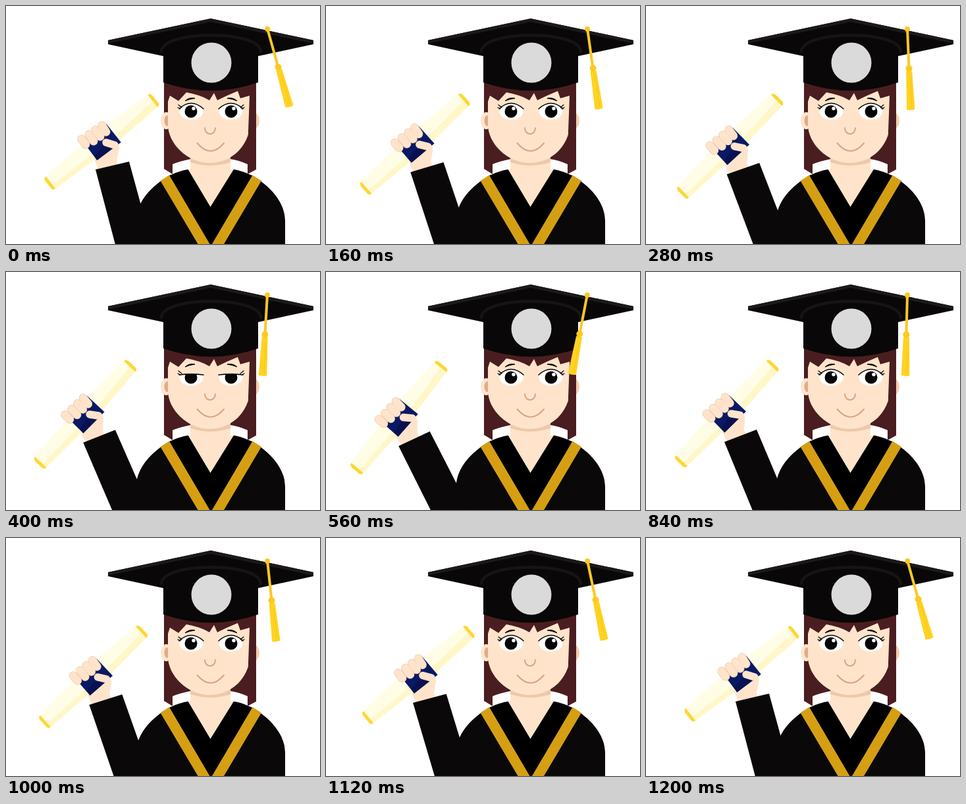
Animation of 477 by 361 pixels, one loop 1240 ms. Source, as an HTML page:

```html
<!DOCTYPE html>
<html lang="en">
<head>
<meta charset="utf-8">
<title>Graduate waving a diploma</title>
<style>
html, body { margin: 0; width: 100%; height: 100%; overflow: hidden; background: #fff; }
svg { display: block; width: 477px; height: 361px; }
.skin { fill: #ffe4cb; }
.hair { fill: #4a1e20; }
.gown { fill: #0a0808; }
.line { fill: none; stroke-linecap: round; }
</style>
</head>
<body>
<svg viewBox="0 0 477 361">
  <defs>
    <g id="eye">
      <ellipse cx="281.500" cy="160" rx="18" ry="12.500" fill="#fff"/>
      <circle cx="281" cy="160" r="9.500" fill="#060505"/>
      <path class="skin lid"/>
      <path class="line lash" stroke="#0a0707" stroke-width="1.600"/>
      <path class="line" d="M265 156L261 154M267 154L262 150" stroke="#0a0707" stroke-width="1.300"/>
    </g>
    <path id="brow" d="M272 144Q278 138 287 140Q279 141 272 144Z" fill="#0a0707" stroke="#0a0707"/>
    <path id="stole" d="M234.500 265L248 256.500L309.500 361H291.500Z" fill="#d59f14"/>
  </defs>

  <!-- head -->
  <path class="hair" d="M240 112H380V248L367 255V240Q354 234 340 232H281Q265 235 253 240V255L240 247Z"/>
  <path class="skin" d="M280 225H341V248L347 249L311 306L276 249L280 248Z"/>
  <path d="M280 230H341V237Q311 247 280 237Z" fill="#edc9ac"/>
  <ellipse class="skin" cx="243.500" cy="174" rx="8.500" ry="13"/>
  <ellipse cx="245" cy="174" rx="4.500" ry="8" fill="#deab8a"/>
  <ellipse cx="377" cy="174" rx="8" ry="12" fill="#f2cfb0"/>
  <path class="skin" d="M246 122H371V180C368 213 343 238 309 238S246 208 246 180Z"/>
  <path class="hair" d="M371 112H380V248L368 240V190Z"/>
  <use href="#eye"/>
  <use href="#eye" transform="matrix(-1 0 0 1 623 0)"/>
  <g id="glints" fill="#fff">
    <circle cx="285" cy="155.500" r="2.700"/>
    <circle cx="346" cy="155.500" r="2.700"/>
  </g>
  <path class="hair" d="M240 110H380V136H370L356 140L352 129Q337 135 321 143L316 132L309 143Q296 135 274 131L262 144L249 136L246 145H240Z"/>
  <use href="#brow"/>
  <use href="#brow" transform="matrix(-1 0 0 1 623 0)"/>
  <path class="line" d="M302 185C302 197 318 197 318 185M290.500 208Q311 232 331 208" stroke="#daa583" stroke-width="2"/>

  <!-- cap -->
  <path d="M155 52L311 19L467 52V58L383 76V116Q311 141 239 116V76L155 58Z" fill="#090707"/>
  <path d="M155 52L311 19L467 52V57L311 24L155 57Z" fill="#1c1919"/>
  <path class="line" d="M236 69C238 36 385 36 387 69" stroke="#171414" stroke-width="4.500"/>
  <circle cx="312" cy="86" r="30.500" fill="#dadada"/>

  <!-- gown -->
  <path class="gown" d="M276.500 248C244 252 198 287 198 325V361H424V325C424 287 378 252 346 248L310.500 305Z"/>
  <path d="M248 257L276.500 248L310.500 305L346 248L374 257L313 361H309Z"/>
  <use href="#stole"/>
  <use href="#stole" transform="matrix(-1 0 0 1 622.500 0)"/>

  <!-- raised arm with diploma -->
  <g id="arm">
    <path class="skin" d="M132 226L158 205Q172 206 172 216L168 234L171 246L141 250Z"/>
    <path class="gown" d="M136 248L187 236L225 375L170 377Z"/>
    <g transform="translate(145 205.500) rotate(-38.600)">
      <path d="M-102-12L0-16L102-12V12L0 16L-102 12Z" fill="#fffde5"/>
      <path d="M-102 5L0 7L102 1V12L0 16L-102 12Z" fill="#fff7c8"/>
      <path d="M-99-11H-102L-104-7V9L-102 12H-99ZM99-11H102L104-7V9L102 12H99Z" fill="#ffd633"/>
      <path d="M-22-16L22.500-16.500V19.500L-23 18Z" fill="#0a1964"/>
      <path d="M-22 10L-4 7L8 19L-23 18Z" fill="#0a1150"/>
    </g>
    <path class="line" d="M115 202L121 210M126 195L133 205M136 188L143 198M146 181L152 191" stroke="#eccbb0" stroke-width="13"/>
    <path class="line" d="M115 202L121 210M126 195L133 205M136 188L143 198M146 181L152 191M152 207L165 211" stroke="#ffe4cb" stroke-width="11.500"/>
  </g>

  <g id="tassel">
    <path class="line" d="M397 35V94" stroke="#fac824" stroke-width="4"/>
    <circle cx="397" cy="35" r="4" fill="#fac824"/>
    <path d="M392.500 99L401.500 99L403.500 157Q397 159 391 157Z" fill="#ffd321"/>
    <path class="line" d="M399 106V154" stroke="#f8c51b"/>
    <circle cx="397" cy="95" r="5" fill="#fcca1f"/>
  </g>
</svg>
<script>
const STEP = 40, LOOP = 1240, TURN = 600;
const $ = selector => document.querySelector(selector);
const arm = $('#arm'), tassel = $('#tassel'), lid = $('.lid'), lash = $('.lash'), glints = $('#glints');

function draw(now) {
  const time = Math.floor(now % LOOP / STEP) * STEP;
  const swing = 1 - Math.abs(time - TURN) / TURN;
  const blink = Math.max(0, 1 - Math.abs(time - 465) / 95);

  arm.setAttribute('transform', `rotate(${-12.7 * swing} 200 380)`);
  tassel.setAttribute('transform', `rotate(${28.6 * swing - 15.7} 397 34)`);

  const curve = `M263 156Q281 ${139 + 47 * blink} 300 156`;
  lash.setAttribute('d', curve);
  lid.setAttribute('d', curve + 'V144H263Z');
  glints.setAttribute('opacity', blink > 0 ? 0 : 1);
  requestAnimationFrame(draw);
}
draw(0);
</script>
</body>
</html>
```
